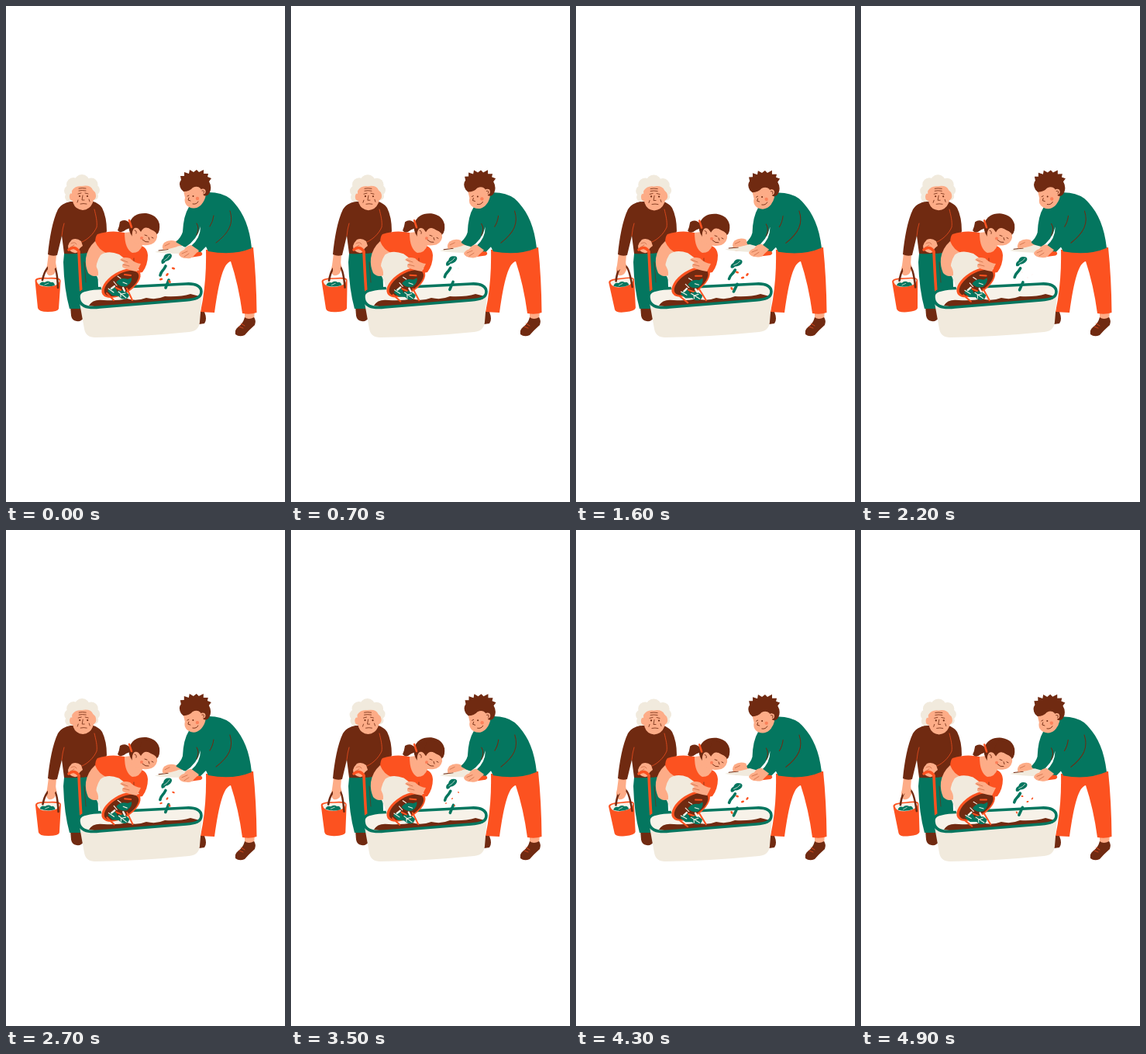
Write an HTML page that moves like this. It is 360 by 639 pixels and loops after 5 s.

```html
<!DOCTYPE html>
<html lang="en">
<head>
<meta charset="utf-8">
<title>Planting together</title>
<style>
html, body { margin: 0; height: 100%; overflow: hidden; background: #fff; }
svg { display: block; width: 100%; height: 100%; }
.b { fill: #702a11; } .o { fill: #fc5220; } .g { fill: #04765f; }
.s { fill: #fdac87; } .c { fill: #f1eadd; } .w { fill: #f7f2e9; }
.l { fill: none; stroke: #702a11; stroke-width: 1.1; stroke-linecap: round; stroke-linejoin: round; }
.ol { stroke: #fc5220; } .gl { stroke: #04765f; } .wl { stroke: #f8f2e7; } .sl { stroke: #c4653f; }
.thin { stroke-width: .7; }
</style>
</head>
<body>
<svg viewBox="0 0 360 639">
  <!-- grandfather -->
  <path class="b" d="M83 386L99 386L100 402Q97 407 91 406Q85 405 84 399Z"/>
  <path class="g" d="M76 308L117 302L119 362L108 365Q105 366 104 390L82 390Q75 365 74 330Z"/>
  <path class="l thin" d="M101 330L103 356"/>
  <path class="s" d="M55 319L65 320L64 333Q67 339 64 342Q62 348 55 347Q50 343 53 334Z"/>
  <path class="b" d="M83 252Q72 254 67 262C60 276 56 300 54 320Q60 323 66 321L72 296L75 319Q94 320 114 317L116 305Q128 299 130 290Q130 272 124 260Q119 253 110 251Z"/>
  <path class="l ol thin" d="M114 262C116 270 118 278 117 285C113 294 105 301 98 304"/>
  <path class="l ol thin" d="M72 296Q73 286 75 280"/>
  <path class="s" d="M85 301Q91 298 97 303L99 309Q94 312 93 317Q88 320 82 315Q77 309 85 301Z"/>
  <path class="l sl thin" d="M84 306Q89 303 91 307M83 311L88 308"/>
  <path class="l ol" d="M81 314Q88 308 94 316Q95 340 97 370" style="stroke-width:3.6"/>
  <g id="elder">
    <g class="c">
      <circle cx="98" cy="227" r="10"/><circle cx="87" cy="230" r="9"/><circle cx="110" cy="230" r="8.5"/>
      <circle cx="82" cy="238" r="7"/><circle cx="114" cy="237" r="7"/><circle cx="82" cy="246" r="6"/>
      <circle cx="114" cy="245" r="5"/>
    </g>
    <path class="s" d="M85 238Q89 231 98 232Q109 230 112 237L115 240Q118 247 113 250Q110 262 99 263Q88 262 86 251Q81 250 82 244Q83 240 85 242Z"/>
    <path class="l" d="M94 235Q98 234 103 235M94 238Q98 237 103 238M93 242L97 241M102 241L106 242M99 244L98 250L101 250M96 255Q100 254 104 255M93 250L92 253M107 249L108 252" style="stroke-width:.8"/>
    <circle class="b" cx="95" cy="245" r="1.1"/><circle class="b" cx="105" cy="245" r="1.1"/>
  </g>
  <g id="bucket">
    <path class="o" d="M37.500 354Q37 349 54 350Q71 349 70.500 354L68 390Q67 394 54 394Q42 394 41 389Z"/>
    <path class="w" d="M39.500 354Q40 351 54 351.500Q69 351 69 354Q68 361 54 361.500Q41 362 39.500 354Z"/>
    <path class="g" d="M43 359Q45 354 50 356Q54 353 58 356Q62 355 63 360Q53 363 43 359Z"/>
    <path class="l wl thin" d="M50 359L55 357"/>
    <path class="l" d="M47 353Q51 335 60 334Q66 335 67 363" style="stroke-width:2.6"/>
  </g>
  <path class="s" d="M54 330L64 330Q66 338 62 339Q57 338 54 342Z"/>

  <!-- girl -->
  <path class="o" d="M118 294Q135 288 153 292L170 308Q182 309 183 321Q183 334 176 343L160 346L125 335L119 318L115 305Q115 297 118 294Z"/>
  <path class="s" d="M115 303Q119 314 131 319L119 334Q122 343 118 347Q112 350 106 344Q102 335 103 325Q105 312 115 303Z"/>
  <path class="s" d="M153 292Q153 313 163 318Q173 318 176 308L170 290Z"/>
  <path class="l thin" d="M165 325Q166 332 163 338"/>
  <g id="girl">
    <path class="b" d="M161 281Q154 273 147 278Q146 285 144 289Q148 294 155 288Q159 286 162 286Z"/>
    <path class="b" d="M163 297Q157 289 159 280Q164 266 181 267Q195 269 198 281Q199 290 195 294L185 299Z"/>
    <path class="s" d="M163 291Q165 283 171 287L174 291Q179 282 187 288Q196 291 195 298Q193 307 183 308Q171 309 162 303Z"/>
    <path class="b" d="M171 286Q180 281 196 293Q200 283 194 274L176 270Z"/>
    <path class="l ol" d="M159 276L162 285" style="stroke-width:2.5"/>
    <path class="l" d="M179 295L182 296M188 298L190 299M184 298L185 301M176 301Q180 305 184 304M166 289Q169 289 168 293" style="stroke-width:.9"/>
    <circle cx="175" cy="299" r="2" fill="#fb7e58"/>
  </g>

  <!-- man -->
  <path class="b" d="M250 393L256 394Q260 404 256 409L249 410Z"/>
  <path class="s" d="M308 392L321 392L320 404L308 403Z"/>
  <path class="b" d="M308 401Q313 405 320 401Q323 405 321 411Q313 418 308 424Q301 427 296 423Q295 417 299 414Q306 409 308 401Z"/>
  <path class="l ol thin" d="M303 409L308 412M301 413L306 415"/>
  <path class="o" d="M258 314L319 311Q323 350 323.500 395Q315 398 305 396Q300 359 290 329C281 331 275 352 269 395L251 394Q259 357 258 314Z"/>
  <g id="man">
    <path class="s" d="M224 301L216 304Q207 301 203 307Q201 313 207 314L220 313L229 308Z"/>
    <path class="g" d="M258 240Q277 239 289 248C304 262 314 281 317 312Q293 322 261 316L258 310L250 318L239 309Q251 299 251 284Q247 301 231 311L219 304Q226 298 228 291Q229 270 236 259Q249 258 258 240Z"/>
    <path class="l" d="M289 264C294 280 288 292 271 305M246 280Q250 286 246 295M268 270Q267 278 263 284" style="stroke-width:1"/>
    <path class="s" d="M229 238L239 228L252 232L258 240Q258 250 251 257Q244 263 236 259Q229 255 231 247Z"/>
    <path class="b" d="M226 236Q222 229 226 224L225 219L230 219L230 214L236 216L237 211L242 214L246 211L249 214L255 211L255 216L261 216L260 220L265 222L262 226Q266 233 263 240Q260 246 255 244L251 235Q247 231 241 234Q237 239 229 239Z"/>
    <circle class="s" cx="254" cy="239" r="3.600"/>
    <path class="l" d="M234 245L236 244M236 247L235 250L238 251M241 255Q246 256 248 252M253 238Q257 237 255 241" style="stroke-width:.9"/>
    <circle class="b" cx="241.500" cy="245" r="1"/>
    <circle cx="247" cy="248" r="2.200" fill="#fb825b"/>
  </g>

  <!-- planter -->
  <path class="c" d="M94 377L101 416Q103 427 115 427Q177 426 236 420Q249 419 250 407L253 371Z"/>
  <path class="w" d="M94 376C93 368 99 366 113 364L232 358C246 357 252 362 252 368C252 376 244 378 232 379L121 388C103 390 95 386 94 376Z"/>
  <path class="b" d="M107 386Q112 377 126 379Q145 380 156 377Q168 381 181 376Q194 379 205 374Q225 375 238 371L250 374Q241 378 232 379L121 388Z"/>
  <path class="l gl" d="M94 376C93 368 99 366 113 364L232 358C246 357 252 362 252 368C252 376 244 378 232 379L121 388C103 390 95 386 94 376Z" style="stroke-width:3.6"/>

  <g id="pot">
    <path class="c" d="M122 321Q131 314 146 320L172 340L125 371Q121 355 116 346Q115 331 122 321Z"/>
    <ellipse class="o" cx="148.500" cy="357" rx="28" ry="14.500" transform="rotate(-31 148.500 357)"/>
    <ellipse class="b" cx="149" cy="357.500" rx="25" ry="12" transform="rotate(-31 149 357.500)"/>
    <g id="scraps">
      <path class="g" d="M142 356Q148 349 157 352L162 350Q163 356 156 361Q147 363 142 356Z"/>
      <path class="g" d="M131 367Q137 359 142 364L146 374L137 373Z"/>
      <path class="g" d="M144 367Q150 363 159 372Q157 380 149 377Q143 374 144 367Z"/>
      <path class="l wl" d="M145 368L155 376M149 371L154 370M148 371L148 375M132 364L139 369M143 360L139 355M151 356L156 358M144 348L148 351"/>
      <path class="l wl" d="M136 364L140 361M151 363L153 367" style="stroke-width:2.4"/>
      <path class="l ol" d="M130 370L139 379M156 364L163 379M153 346L161 347M142 363L148 366" style="stroke-width:2"/>
    </g>
  </g>
  <path class="s" d="M106 331L114 332Q120 340 119 347Q116 349 111 346Q104 341 106 331Z"/>
  <path class="s" d="M174 332Q167 332 160 325Q151 322 147 327L153 331Q148 334 151 337Q157 340 169 342Z"/>
  <path class="l sl thin" d="M149 327L157 330M151 333L159 335"/>

  <!-- falling cuttings -->
  <g id="fall">
    <g id="leaf">
      <path class="g" d="M201 332Q199 328 203 325Q204 318 212 319Q216 321 212 326Q209 329 206 329Q204 333 201 332Z"/>
      <path class="l wl thin" d="M204 328Q209 325 211 321"/>
    </g>
    <path class="l gl" d="M206 335Q204 339 202 341T199 347M210 353L208 358L206 363" style="stroke-width:3.600"/>
  </g>
  <g id="crumbs"></g>

  <g id="tool">
    <path class="c" d="M192 317Q201 314 224 309L245 314L243 321L226 319Q207 319 192 317Z"/>
    <path class="l" d="M197 315L209 313.500" style="stroke-width:1"/>
    <path class="o" d="M237 316L252 317Q255 320 251 322L238 324Z"/>
    <path class="s" d="M204 305Q211 300 219 303L221 310Q212 313 203 314Q200 311 204 305Z"/>
    <path class="l sl thin" d="M205 309L211 306"/>
    <path class="s" d="M239 308L249 315L243 321Q240 326 233 325Q225 325 223 320Q224 316 230 314Q232 309 239 308Z"/>
    <path class="l sl thin" d="M227 319L234 316M230 323L236 319"/>
  </g>
</svg>
<script>
const $ = id => document.getElementById(id);
const LOOP = 5000, STEP = 100, SWAY = 3000;
const early = [[208, 346], [200, 352], [216, 338], [211, 355]];
const late = [[221, 346], [215, 350], [208, 343], [201, 364]];

// move and turn a part about a pivot
function pose(id, s, dx, dy, turn, px, py) {
  $(id).setAttribute('transform',
    `translate(${dx * s} ${dy * s}) rotate(${turn * s} ${px} ${py})`);
}

function crumbs(spots, size) {
  return spots.map(([x, y], i) =>
    `<ellipse class="o" cx="${x}" cy="${y}" rx="${2.3 * size}" ry="${1.4 * size}" transform="rotate(${i * 35 - 50} ${x} ${y})"/>`
  ).join('');
}

function draw(now) {
  const t = Math.floor(now % LOOP / STEP) * STEP;
  const s = (1 - Math.cos(t / SWAY * 2 * Math.PI)) / 2;
  pose('elder', s, 2, .5, .5, 99, 260);
  pose('bucket', s, 2.5, 0, -7, 60, 336);
  pose('girl', s, 0, .7, .6, 170, 300);
  pose('man', s, 0, 0, -1.2, 292, 314);
  pose('pot', s, -1, -1.5, -2, 140, 340);
  pose('scraps', s, 3, 4, -5, 149, 360);
  pose('fall', s, -1, 5, 4, 205, 340);
  pose('leaf', s, 0, 1.5, 8, 206, 326);
  pose('tool', s, 0, -1.5, 2, 240, 318);
  $('crumbs').innerHTML = crumbs(s < .5 ? early : late, Math.abs(1 - 2 * s));
  requestAnimationFrame(draw);
}
requestAnimationFrame(draw);
</script>
</body>
</html>
```
